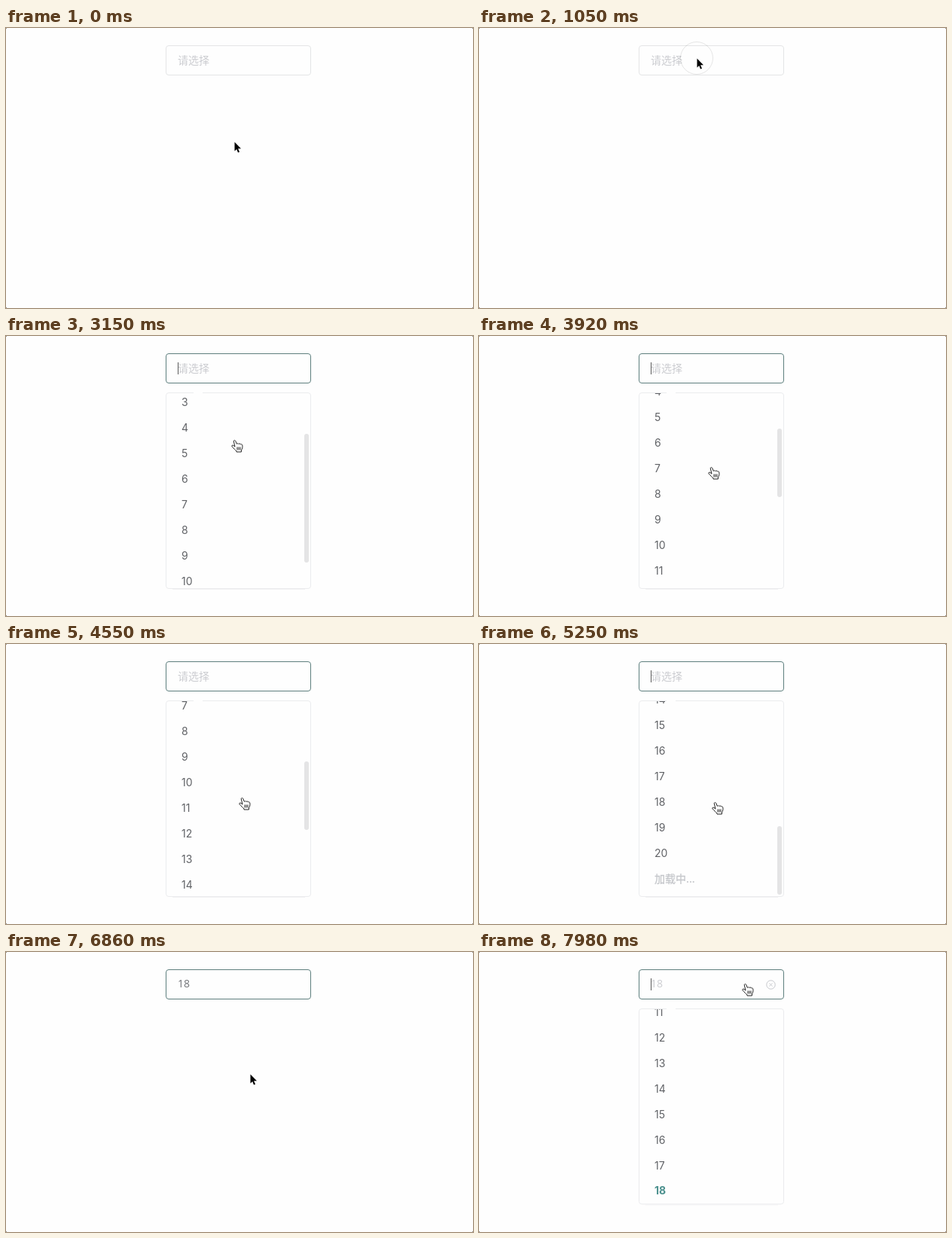
These frames come from a looping animation (620 by 372 pixels, 8000 ms). An HTML page:

```html
<!DOCTYPE html>
<html lang="zh-CN">
<head>
<meta charset="utf-8">
<title>Select</title>
<style>
html, body { margin: 0; width: 100%; height: 100%; overflow: hidden; background: #fefefe; }
#stage { position: relative; width: 620px; height: 372px; overflow: hidden; font: 14px "Open Sans", sans-serif; }
#stage div, #stage svg { position: absolute; box-sizing: border-box; }
#stage .cjk { font-family: "Noto Sans CJK SC", "Noto Sans CJK", sans-serif; }
.corner { width: 1px; height: 1px; background: #8a8a8a; }
#field { left: 212px; top: 23px; width: 193px; height: 40px; border: 1px solid; border-radius: 4px; background: #fefefe; }
#value { left: 15px; top: 0; line-height: 36px; white-space: nowrap; }
#caret { left: 228px; top: 35px; width: 1px; height: 16px; background: #5a5a5a; }
#clear { left: 381px; top: 37px; }
#panel { left: 212px; top: 75px; width: 193px; transform-origin: 50% 0; border: 1px solid #ebecee; border-radius: 4px; background: #fefefe; }
#notch { left: 36px; top: -1px; width: 12px; height: 1px; background: #fefefe; }
#shade { left: 8px; right: 7px; bottom: -2px; height: 1px; background: #f2f2f3; }
#view { left: 0; top: 0; width: 191px; height: 100%; overflow: hidden; }
#list { left: 0; top: 6px; width: 191px; }
.row { left: 20px; line-height: 34px; white-space: nowrap; color: #606266; font-family: Inter, sans-serif; }
.row.on { color: #4c918e; font-weight: 700; }
#busy { margin-top: -1px; color: #c4c6ca; -webkit-text-stroke: .3px #c4c6ca; }
#thumb { left: 183px; width: 6px; border-radius: 3px; background: #e4e4e5; }
#ring { border: 1px solid rgba(0, 0, 0, .1); border-radius: 50%; transform: translate(-50%, -50%); }
#stage svg { overflow: visible; }
#arrow, #hand { left: 0; top: 0; }
</style>
</head>
<body>
<div id="stage">
  <div class="corner" style="left:0;top:0"></div>
  <div class="corner" style="right:0;top:0"></div>
  <div class="corner" style="left:0;bottom:0"></div>
  <div class="corner" style="right:0;bottom:0"></div>
  <div id="field"><div id="value"></div></div>
  <div id="caret"></div>
  <svg id="clear" width="13" height="13" fill="none" stroke="#c6c8cc">
    <circle cx="6.5" cy="6.5" r="5.7"/><path d="M4.5 4.5l4 4m0-4l-4 4"/>
  </svg>
  <div id="panel">
    <div id="shade"></div>
    <div id="view"><div id="list"><div id="busy" class="row cjk">加载中...</div></div></div>
    <div id="thumb"></div>
    <div id="notch"></div>
  </div>
  <div id="ring"></div>
  <svg id="arrow" width="12" height="17">
    <path d="M.5 .5V12.5L3.2 10L5 14.5L7 13.7L5.1 9.3H9Z" stroke="#fff" paint-order="stroke"/>
  </svg>
  <svg id="hand" width="16" height="17" fill="#fff" stroke="#222" stroke-linejoin="round">
    <path d="M3.3 2C3 .4 5.2 0 5.8 1.6L7.3 5.4C8 4.5 9.4 4.6 9.9 5.5C10.6 4.7 12 4.9 12.4 6C13.3 5.4 14.5 5.9 14.8 7.2C15.4 10.5 14.4 12 13.4 14V16H7V14.8C5 13.5 3.6 11.4 1 8.8C.2 7.6 1.7 6.6 2.9 7.4L5 9.2Z"/>
    <path d="M8 9.5v4m2-4v4m2-4v4" fill="none"/>
  </svg>
</div>
<script>
const LOOP = 8000, ROW = 34, VIEW = 259, TRACK = 255, PAGE = 10, PICK = 18, BLINK = 535;
const FOCUS = 1635, OPEN = 1680, CHOOSE = 6370, CLOSE = 6400, REOPEN = 7770;
const LOADS = [2170, 3920, 5740];
const CLICKS = [1050, 1610, 7630];

// start, duration, x, y: each move begins where the one before ended
const MOVES = [
  [0, 0, 299, 151], [70, 630, 285, 40], [1260, 210, 300, 39], [2310, 690, 299, 138],
  [3220, 1330, 309, 204], [4550, 700, 309, 210], [5810, 350, 316, 216],
  [6696, 444, 328, 42], [7210, 280, 349, 42]
];

const el = id => document.getElementById(id);
const show = (id, on) => { el(id).style.visibility = on ? 'inherit' : 'hidden'; };
const part = (t, from, len) => Math.max(0, Math.min(1, (t - from) / (len || 1)));
const smooth = p => p * p * (3 - 2 * p);
const easeOut = p => 1 - (1 - p) ** 5;
const mix = (a, b, p) => a + (b - a) * p;

const rows = Array.from({ length: PAGE * LOADS.length }, (_, i) => {
  const row = document.createElement('div');
  row.className = 'row';
  row.textContent = i + 1;
  row.style.top = i * ROW + 'px';
  el('list').append(row);
  return row;
});

function pointerAt(t) {
  let x = 0, y = 0;
  for (const [from, len, toX, toY] of MOVES) {
    if (t < from) break;
    const p = smooth(part(t, from, len));
    x = mix(x, toX, p);
    y = mix(y, toY, p);
  }
  return [Math.round(x), Math.round(y)];
}

function scrollAt(t) {
  if (t >= REOPEN) return PICK * ROW + 6 - VIEW;
  return 127 * smooth(part(t, 2700, 773)) + 340 * smooth(part(t, 4180, 1070));
}

function drawField(t) {
  const p = part(t, 1190, 280);
  el('field').style.borderColor = `rgb(${mix(228, 94, p)}, ${mix(229, 127, p)}, ${mix(230, 126, p)})`;
  const picked = t >= CHOOSE, value = el('value');
  value.textContent = picked ? PICK : '请选择';
  value.className = picked ? '' : 'cjk';
  value.style.color = picked && t < REOPEN ? '#707276' : '#cbccd0';
  const blink = t >= FOCUS && t < CHOOSE && Math.floor((t - FOCUS) / BLINK) % 2 === 0;
  show('caret', blink || t >= REOPEN);
  show('clear', t >= 7140);
}

function drawPanel(t) {
  const [first, closing, second] = [OPEN, CLOSE, REOPEN].map(from => easeOut(part(t, from, 300)));
  const open = first - closing + second;
  const panel = el('panel');
  panel.style.visibility = open > 0 ? 'visible' : 'hidden';
  panel.style.opacity = open;
  panel.style.transform = `scaleY(${open})`;

  const count = PAGE * LOADS.filter(at => t >= at).length;
  const total = (count + 1) * ROW + 12, scroll = scrollAt(t);
  panel.style.height = Math.min(total, VIEW) + 2 + 'px';
  el('list').style.top = 6 - Math.round(scroll) + 'px';
  rows.forEach((row, i) => {
    row.style.display = i < count ? 'block' : 'none';
    row.classList.toggle('on', i + 1 === PICK && t >= 6300);
  });
  el('busy').style.top = count * ROW + 'px';

  const thumb = el('thumb');
  thumb.style.opacity = t < REOPEN ? part(t, 2520, 140) : 0;
  thumb.style.top = 2 + scroll / total * TRACK + 'px';
  thumb.style.height = VIEW / total * TRACK + 'px';
}

function drawPointer(t) {
  const [x, y] = pointerAt(t), tip = x + 4;
  const isArrow = t < 1260 || (t >= 6500 && t < 7140);
  show('arrow', isArrow);
  show('hand', !isArrow);
  el('arrow').style.transform = `translate(${tip}px, ${y}px)`;
  el('hand').style.transform = `translate(${x}px, ${y}px)`;

  const ring = el('ring').style;
  show('ring', CLICKS.some(at => t >= at && t < at + 70));
  ring.left = tip + 'px';
  ring.top = y + 'px';
  ring.width = ring.height = t < OPEN - 70 ? '44px' : '62px';
}

function draw(t) {
  drawField(t);
  drawPanel(t);
  drawPointer(t);
}

const start = performance.now();
function tick() {
  draw((performance.now() - start) % LOOP);
  requestAnimationFrame(tick);
}
draw(0);
requestAnimationFrame(tick);
</script>
</body>
</html>
```
